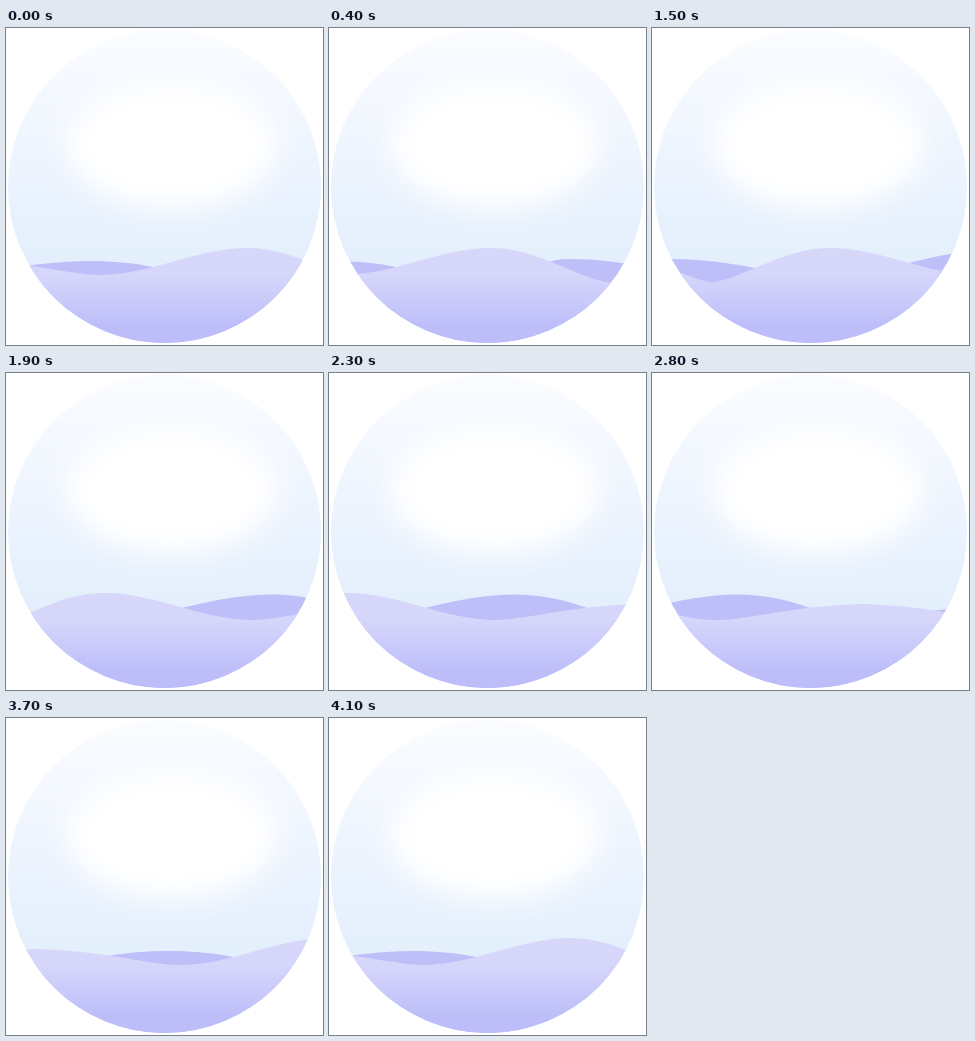
Recreate the animation shown at these times as an HTML page with a canvas. Size 317 by 317 pixels, loop 4.2 s.

```html
<!DOCTYPE html>
<html lang="en">
<head>
<meta charset="utf-8">
<title>Rolling dunes</title>
<style>
  html, body { margin: 0; width: 100%; height: 100%; overflow: hidden; background: #fff; }
  canvas { display: block; }
</style>
</head>
<body>
<canvas id="stage" width="317" height="317"></canvas>
<script>
const SIZE = 317;
const LOOP = 4200;
const STEP = 100;
const SPEED = 20;
const PERIOD = 820;
const ctx = document.getElementById('stage').getContext('2d');

// Half of the front dune; its mirror image completes one period.
const frontHalf = new Path2D(`M0 254.5 C32 250 72 220 118 220
  C170 220 215 247 267 247 C295 247 340 233 410 231 V${SIZE} H0 Z`);

const backDune = new Path2D(`M-30 248 C0 241 40 233 82 233
  C110 233 130 235.5 147 239 L200 250 L240 250 L270 246
  C285 238 300 231 320 231 C350 231 380 235.5 403 240
  L440 247 L520 244 C555 236 600 221.5 645 221.5
  C675 221.5 700 228 718 235 L750 248 L790 248 V${SIZE} H-30 Z`);

function verticalGradient(y0, y1, stops) {
  const gradient = ctx.createLinearGradient(0, y0, 0, y1);
  stops.forEach(([at, color]) => gradient.addColorStop(at, color));
  return gradient;
}

const sky = verticalGradient(0, 235, [[0, '#fafcff'], [0.3, '#f4f8ff'], [0.65, '#ebf3fe'], [1, '#e3effc']]);
const sand = verticalGradient(220, 300, [[0, '#d7d7fa'], [0.35, '#d6d6fb'], [1, '#bcbdf9']]);

function drawSky() {
  ctx.fillStyle = sky;
  ctx.fillRect(0, 0, SIZE, SIZE);
  ctx.save();
  ctx.filter = 'blur(15px)';
  ctx.fillStyle = '#fff';
  ctx.beginPath();
  ctx.ellipse(166, 118, 106, 63, 0, 0, Math.PI * 2);
  ctx.fill();
  ctx.restore();
}

function fillAt(path, x, flip = 1) {
  ctx.save();
  ctx.translate(x, 0);
  ctx.scale(flip, 1);
  ctx.fill(path);
  ctx.restore();
}

function draw(time) {
  const offset = Math.floor((time % LOOP) / STEP) * SPEED;
  ctx.clearRect(0, 0, SIZE, SIZE);
  ctx.save();
  ctx.beginPath();
  ctx.arc(158.5, 158.5, 156.5, 0, Math.PI * 2);
  ctx.clip();
  drawSky();

  ctx.fillStyle = '#bebff9';
  fillAt(backDune, -offset);
  fillAt(backDune, PERIOD - offset);

  ctx.fillStyle = sand;
  fillAt(frontHalf, 360 - offset, -1);
  fillAt(frontHalf, 360 - offset);
  fillAt(frontHalf, 360 + PERIOD - offset, -1);
  ctx.restore();
}

let start;
function tick(now) {
  start ??= now;
  draw(now - start);
  requestAnimationFrame(tick);
}
requestAnimationFrame(tick);
</script>
</body>
</html>
```
